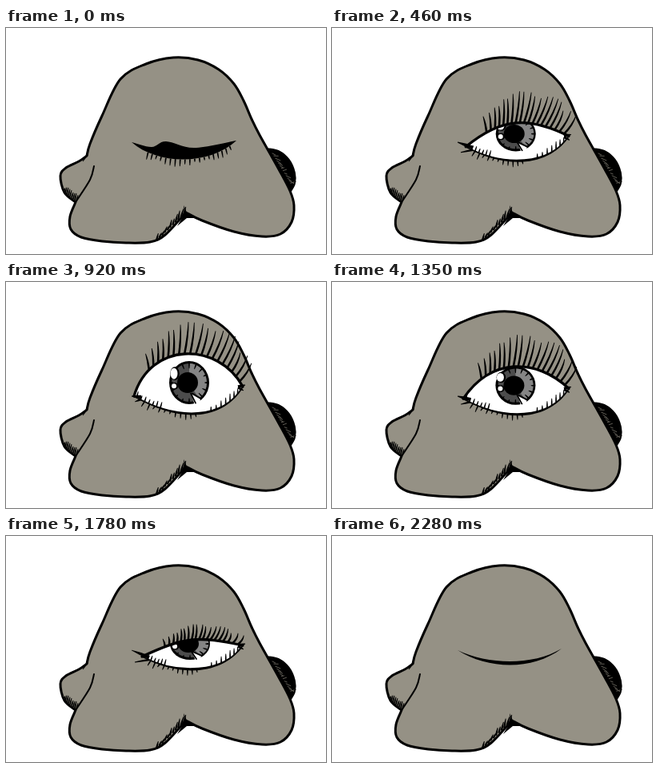
Animation of 400 by 283 pixels, one loop 2510 ms. Source, as an HTML page:

```html
<!DOCTYPE html>
<html lang="en">
<head>
<meta charset="utf-8">
<title>Blinking eye</title>
<style>
  html, body { margin: 0; width: 100%; height: 100%; overflow: hidden; background: #fff; }
  svg { display: block; width: 100vw; height: 100vh; }
  .line { fill: none; stroke: #000; stroke-linecap: round; stroke-linejoin: round; }
</style>
</head>
<body>
<svg id="stage" viewBox="0 0 400 283"></svg>
<script>
const SKIN = '#959185';
const HOLDS = [230, 230, 230, 230, 430, 230, 200, 270, 230, 230];
const LOOP = HOLDS.reduce((a, b) => a + b);
const poseAt = step => 5 - Math.abs(step - 4); // 0 shut, 5 wide open

const stage = document.getElementById('stage');

function add(parent, tag, attrs) {
  const el = document.createElementNS('http://www.w3.org/2000/svg', tag);
  for (const k in attrs) el.setAttribute(k, attrs[k]);
  return parent.appendChild(el);
}
const fill = (g, d, color = '#000') => add(g, 'path', { d, fill: color });
const line = (g, d, w, color = '#000') => add(g, 'path', { d, class: 'line', 'stroke-width': w, style: `stroke:${color}` });
const oval = (g, cx, cy, rx, ry, color) => add(g, 'ellipse', { cx, cy, rx, ry, fill: color });
const times = (n, draw) => { for (let i = 0; i < n; i++) draw(i, i / (n - 1)); };

function noise(i) {
  const s = Math.sin(i * 127.1 + 3.7) * 43758.5;
  return (s - Math.floor(s)) * 2 - 1;
}

// Smooth curve through the given points
function spline(text, start = 'M') {
  const p = text.split(' ').map(s => s.split(',').map(Number));
  let d = start + p[0];
  for (let i = 0; i < p.length - 1; i++) {
    const a = p[i - 1] || p[i], b = p[i], c = p[i + 1], e = p[i + 2] || c;
    d += `C${b.map((v, k) => v + (c[k] - a[k]) / 6)} ${c.map((v, k) => v - (e[k] - b[k]) / 6)} ${c}`;
  }
  return d;
}

// Cubic curves are [x0, y0, x1, y1, x2, y2, x3, y3]
function bezier(p, t) {
  const u = 1 - t;
  return [0, 1].map(k => u * u * u * p[k] + 3 * u * u * t * p[k + 2] +
                         3 * u * t * t * p[k + 4] + t * t * t * p[k + 6]);
}
const arc = (p, start = 'M') => `${start}${p.slice(0, 2)}C${p.slice(2)}`;

// Band that is thickest in the middle
function crescent(g, [x0, y0, x1, y1, x2, y2, x3, y3], depth) {
  fill(g, arc([x0, y0, x1, y1, x2, y2, x3, y3]) +
          arc([x3, y3, x2, y2 + depth, x1, y1 + depth, x0, y0], 'L') + 'Z');
}

// Tapered hair starting at (x, y)
function hair(g, [x, y], dx, dy, w = 1, bend = 0) {
  const len = Math.hypot(dx, dy) || 1, nx = -dy / len, ny = dx / len;
  const at = (f, n) => [x + dx * f + nx * n, y + dy * f + ny * n];
  fill(g, `M${at(0, w)}Q${at(.55, bend + w)} ${at(1, .4)}L${at(1, -.4)}Q${at(.55, bend - w)} ${at(0, -w)}Z`);
}

function drawBody(g) {
  const paw = spline('327,151 341,154 354,165 361,181 361,195 355,206') + 'Z';
  fill(g, paw);
  times(13, i => line(g, `M${333 + i * 1.9},${157 + i * 3.1}l${5 + 2 * noise(i)},${1 + 3 * noise(i + 9)}`, .9, '#6b685f'));
  line(g, paw, 1.6);

  const outline =
    spline('101,160 105,145 120,110 143,64 175,45 209,37 240,40 266,52 285,70 297,91 307,114 317,134 341,177 355,204 360,222 357,243 343,258 320,261 285,255 245,241 225,231') +
    spline('225,231 199,259 180,268 150,269 120,267 94,262 81,252 80,236 87,218', 'L') +
    spline('87,218 73,206 68,185 75,175 91,167 101,160', 'L') + 'Z';
  fill(g, outline, SKIN);
  line(g, outline, 3);
  line(g, spline('110,173 105,190 87,218'), 2);
  fill(g, 'M222,222L226,231L236,238L226,238L214,248L223,233Z');
  times(11, i => hair(g, [188 + i * 3.4, 266 - i * 3.2], 3 + noise(i), -9 - 3 * noise(i + 4), 1.2));
  times(9, i => hair(g, [72 + i * 2, 205 + i * 1.5], 2, -6 - i * .5 - 2 * noise(i), 1));
  hair(g, [102, 158], -6, 9, 1.1);
}

function drawShut(g) {
  crescent(g, [157, 143, 195, 161, 250, 163, 287, 141], 6);
}

function drawSlit(g) {
  const low = [288, 141, 255, 172, 190, 172, 157, 143];
  fill(g, spline('157,143 182,149 200,142 235,150 288,141') + arc(low, 'L') + 'Z');
  times(19, (i, u) => hair(g, bezier(low, .08 + .74 * u), 2 - 4 * u, 7 + 3 * noise(i), .9));
}

// k is how far the lid is up, 0 to 1
function drawOpen(g, id, k) {
  const [x0, y0, x1, y1] = [170 - 10 * k, 151 - 8 * k, 296, 137 - 6 * k];
  const top = (8 * (130 - 40 * k) - y0 - y1) / 6;
  const lid = [x0, y0, 225 - 45 * k, top, 240 + 25 * k, top, x1, y1];
  const low = [x1, y1, 272, 172, 215, 174, x0, y0];
  const shape = arc(lid) + arc(low, 'L') + 'Z';
  add(add(g, 'clipPath', { id }), 'path', { d: shape });
  fill(g, shape, '#fff');

  const eye = add(g, 'g', { 'clip-path': `url(#${id})` });
  const cx = 230 - k, cy = 135 - 9 * k, rx = 25, ry = 20 + 7 * k;
  oval(eye, cx, cy, rx, ry, '#000');
  oval(eye, cx, cy, rx - 3, ry - 3, '#4c4c4c');
  fill(eye, `M${cx},${cy - ry + 3}A${rx - 3},${ry - 3} 0 0 1 ${cx + 12},${cy + ry * .74}L${cx},${cy}Z`, '#858585');
  times(16, i => {
    const a = i * Math.PI / 8, r = .2 + .08 * noise(i), c = Math.cos(a), s = Math.sin(a);
    hair(eye, [cx + (rx - 2) * c, cy + (ry - 2) * s], -rx * r * c, -ry * r * s, .9);
  });
  oval(eye, cx - 2, cy, 13, 11 + 2 * k, '#000');
  fill(eye, `M${cx + 3},${cy + ry * .55}l11,${ry * .22}l-2,${ry * .3}h-5Z`, '#fff');
  line(eye, `M${cx + 2},${cy + ry * .5}l6,${ry * .45}m-4,${-ry * .45}l11,${ry * .25}`, 1.7);
  const shine = (y, a, b) => {
    oval(eye, cx - 18, y, a + 1.3, b + 1.3, '#000');
    oval(eye, cx - 19, y, a, b, '#fff');
  };
  shine(cy - ry * .42, 4.5, 3 + 4 * k);
  shine(cy + ry * .16, 3, 3);

  // Shading in both corners
  times(7, i => {
    hair(eye, bezier(low, .08 + i * .05), 0, -8 - 3 * noise(i), .9);
    hair(eye, bezier(low, .8 + i * .03), 2, -7 - 2 * noise(i + 3), .9);
  });

  line(g, arc(lid), 3.3);
  line(g, arc(low), 1.8);
  crescent(g, low, 3);
  hair(g, [x0 + 9, y0 + 1], 148 - x0, 142 - y0, 2.2);
  hair(g, [x0 + 9, y0 + 4], 152 - x0, 3, 1.3);
  hair(g, [x1 - 6, y1], 9, -2, 1.8);
  hair(g, [x1 - 6, y1 + 1], 7, 4, 1.8);

  const reach = 19 + 20 * Math.min(1, k * 3.5);
  times(19, (i, u) => {
    const len = reach * (.62 + .38 * Math.sin(Math.PI * u)) * (.94 + .12 * noise(i + 5));
    hair(g, bezier(lid, .2 + .76 * u), len * (-.15 + .75 * u) + 2 * noise(i), -len, 1.3, 1 + 2 * u);
  });
  times(11, (i, u) => hair(g, bezier(low, .52 + .4 * u), 1 - 5 * u, 7 + 3 * noise(i), .9));
}

drawBody(add(stage, 'g'));
const poses = Array.from({ length: 6 }, () => add(stage, 'g'));
drawShut(poses[0]);
drawSlit(poses[1]);
[0, .28, .6, 1].forEach((k, i) => drawOpen(poses[i + 2], 'eye' + i, k));

const begin = performance.now();
function tick() {
  let t = (performance.now() - begin) % LOOP, step = 0;
  while (t >= HOLDS[step]) t -= HOLDS[step++];
  poses.forEach((g, i) => { g.style.display = i === poseAt(step) ? '' : 'none'; });
  requestAnimationFrame(tick);
}
tick();
</script>
</body>
</html>
```
